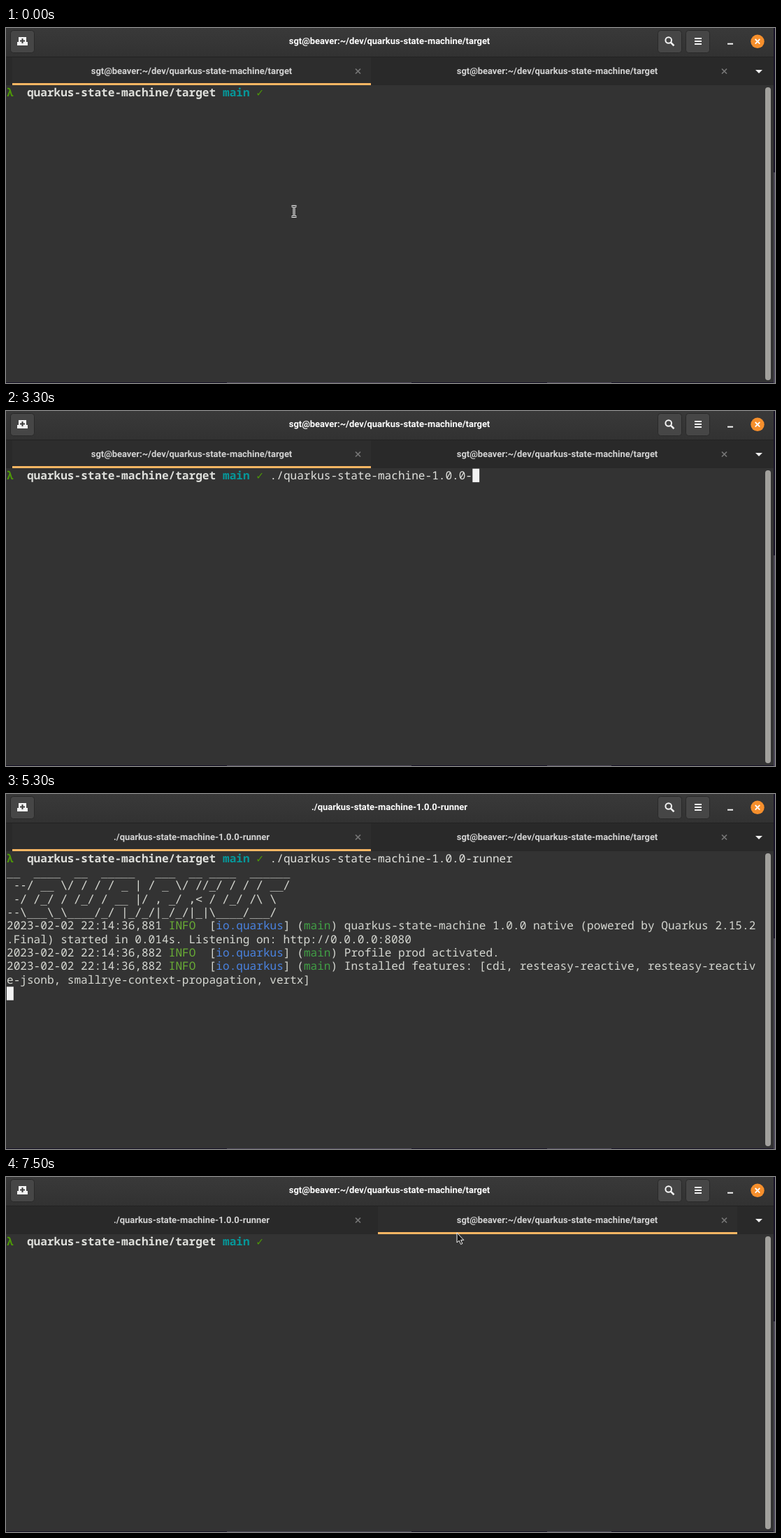
An HTML page for the animation above (8000 ms loop, 1100 by 509 pixels).

```html
<!DOCTYPE html>
<html lang="en">
<head>
<meta charset="utf-8">
<title>Terminal session</title>
<style>
  html, body { margin: 0; width: 100%; height: 100%; overflow: hidden; background: #333; }
  svg { display: block; width: 1100px; height: 509px; }
  text { white-space: pre; text-rendering: geometricPrecision; }
  .mono { font: 16.09px "Noto Sans Mono", "DejaVu Sans Mono", monospace; font-variant-ligatures: none; }
  .mono .b { font-weight: 700; }
  .mono .banner { font: 16.04px "DejaVu Sans Mono", monospace; }
  .ui { font: 700 12.95px Roboto, "Open Sans", sans-serif; text-anchor: middle; }
</style>
</head>
<body>
<svg id="stage" viewBox="0 0 1100 509" xmlns="http://www.w3.org/2000/svg">
  <defs>
    <linearGradient id="bar" x2="0" y2="1">
      <stop stop-color="#393939"/><stop offset="1" stop-color="#323232"/>
    </linearGradient>
  </defs>

  <!-- desktop showing around the window -->
  <rect width="1100" height="509" fill="#171228"/>
  <path d="M1098 207h2v302h-2zM316 508h264v1h-264zM774 508h92v1h-92z" fill="#4b4658"/>
  <rect width="1098" height="508" fill="#333"/>

  <!-- header bar -->
  <rect width="1098" height="41" fill="url(#bar)"/>
  <g fill="#464646" stroke="#292929">
    <rect x="6.5" y="3.5" width="34" height="32" rx="4"/>
    <rect x="932.5" y="3.5" width="34" height="32" rx="4"/>
    <rect x="972.5" y="3.5" width="34" height="32" rx="4"/>
  </g>
  <path d="M18 13h11v7h2v5H16v-5h2z" fill="#f4f4f4"/>
  <path d="M23.5 15v7M20 18.5h7" stroke="#3c3c3c" stroke-width="2"/>
  <g fill="none" stroke="#f4f4f4" stroke-width="2">
    <circle cx="947.7" cy="17.5" r="4.3"/>
    <path d="M950.8 20.6l4.7 4.7" stroke-width="2.6"/>
    <path d="M985 15h10M985 19h10M985 23h10"/>
    <path d="M1032 22.7h8"/>
  </g>
  <circle cx="1075" cy="19.3" r="9.7" fill="#f68f2c"/>
  <path d="M1071.7 16l6.6 6.6M1078.3 16l-6.6 6.6" stroke="#fff" stroke-width="1.8"/>
  <text id="title" class="ui" x="548.5" y="23.2" fill="#fff"></text>

  <!-- tab strip -->
  <rect y="41" width="1098" height="41" fill="#292929"/>
  <rect y="41" width="1098" height="1" fill="#222"/>
  <rect id="activeTab" y="42" height="40" fill="#2d2d2d"/>
  <rect id="hoverLine" x="532" y="79" width="514" height="3" fill="#202020"/>
  <rect id="activeLine" y="79" height="3" fill="#f9b663"/>
  <text id="tabA" class="ui" x="265.5" y="65.8" fill="#d4d4d4"></text>
  <text id="tabB" class="ui" x="788.5" y="65.8" fill="#d4d4d4"></text>
  <path d="M500 58.5l7 7M507 58.5l-7 7M1024 58.5l7 7M1031 58.5l-7 7" stroke="#777" stroke-width="1.7"/>
  <path d="M1072 60h10l-5 5z" fill="#f0f0f0"/>

  <!-- terminal -->
  <rect x="1086" y="85" width="8" height="420" rx="4" fill="#a2a19d"/>
  <g class="mono" fill="#d6d8d2">
    <g id="prompt"></g>
    <text id="typed" fill="#e2e3df"></text>
    <g id="output"></g>
  </g>
  <rect id="caret" width="9.8" height="19.4" fill="#f2f2f2"/>

  <!-- pointers, drawn around their hot spots -->
  <g id="beam" fill="none">
    <path d="M-3.5 -7.5h7M0 -7.5v15M-3.5 7.5h7" stroke="#fff" stroke-width="3"/>
    <path d="M-3.5 -7.5h7M0 -7.5v15M-3.5 7.5h7" stroke="#222"/>
  </g>
  <path id="arrow" d="M0 0v14l3.2-2.8 2.3 5.3 2.4-1-2.3-5.1h4.2z" fill="#161616" stroke="#f4f4f4" stroke-linejoin="round"/>
</svg>

<script>
const LOOP = 8000;
const COL = 9.657, ROW = 19.36, LEFT = 1, TOP = 82.7, BASE = 97.6;
const PROMPT_END = 39;
const SHELL = 'sgt@beaver:~/dev/quarkus-state-machine/target';
const COMMAND = './quarkus-state-machine-1.0.0-runner';
const GREEN = '#4e9a06', CYAN = '#06989a';
const INFO = '#69ad35', BLUE = '#4a83e2', THREAD = '#41a045';

// [time, typed characters, caret column]
const KEYS = [
  [0, 0, 0], [600, 1, 1], [800, 2, 2], [1400, 3, 3], [1600, 4, 4], [1700, 5, 5],
  [1800, 6, 6], [1900, 7, 7], [2200, 9, 9], [2900, 10, 10], [3000, 11, 11],
  [3300, 30, 30], [4100, 31, 31], [4600, 36, 37]
];
const CARET_TOGGLES = [500, 3800, 4100, 5100, 5200, 5800, 6400, 7500];
const LAUNCH = 5200, LOGGED = 5300, SWITCH = 6900;
const MOVE = { start: 6000, steps: 8, from: [412, 263], to: [645, 80] };

const $ = id => document.getElementById(id);
const colX = col => LEFT + col * COL;

function put(parent, row, col, content, fill, style) {
  const node = document.createElementNS('http://www.w3.org/2000/svg', 'text');
  node.setAttribute('x', colX(col));
  node.setAttribute('y', BASE + row * ROW);
  if (fill) node.setAttribute('fill', fill);
  if (style) node.setAttribute('class', style);
  node.textContent = content;
  parent.append(node);
}

function putLog(row, millis, message) {
  const parts = [
    ['2023-02-02 22:14:36,' + millis + ' '], ['INFO', INFO], ['  ['],
    ['io.quarkus', BLUE], ['] ('], ['main', THREAD], [') ' + message]
  ];
  let col = 0;
  for (const [content, fill] of parts) {
    put($('output'), row, col, content, fill);
    col += content.length;
  }
}

function build() {
  const prompt = $('prompt'), output = $('output');
  put(prompt, 0, 0, 'λ', GREEN, 'b');
  put(prompt, 0, 3, 'quarkus-state-machine/target', '#dfe0dc', 'b');
  put(prompt, 0, 32, 'main', CYAN, 'b');
  put(prompt, 0, 37, '✓', GREEN, 'b');
  $('typed').setAttribute('x', colX(PROMPT_END));
  $('typed').setAttribute('y', BASE);

  [
    '__  ____  __  _____   ___  __ ____  ______',
    ' --/ __ \\/ / / / _ | / _ \\/ //_/ / / / __/',
    ' -/ /_/ / /_/ / __ |/ , _/ ,< / /_/ /\\ \\',
    '--\\___\\_\\____/_/ |_/_/|_/_/|_|\\____/___/'
  ].forEach((line, i) => put(output, i + 1, 0, line, null, 'banner'));
  putLog(5, 881, 'quarkus-state-machine 1.0.0 native (powered by Quarkus 2.15.2');
  put(output, 6, 0, '.Final) started in 0.014s. Listening on: http://0.0.0.0:8080');
  putLog(7, 882, 'Profile prod activated.');
  putLog(8, 882, 'Installed features: [cdi, resteasy-reactive, resteasy-reactiv');
  put(output, 9, 0, 'e-jsonb, smallrye-context-propagation, vertx]');
}

function show(id, visible) {
  $(id).setAttribute('visibility', visible ? 'visible' : 'hidden');
}

function label(id, content) {
  if ($(id).textContent !== content) $(id).textContent = content;
}

function drawPointer(t) {
  const step = Math.floor((t - MOVE.start) / 100);
  const p = Math.max(0, Math.min(1, step / MOVE.steps));
  const eased = p * p * (3 - 2 * p);
  const [x, y] = MOVE.from.map((v, i) => v + (MOVE.to[i] - v) * eased);
  const present = t < 600 || t >= MOVE.start;
  const overTabs = y < 82;
  for (const id of ['beam', 'arrow']) $(id).setAttribute('transform', `translate(${x} ${y})`);
  show('beam', present && !overTabs);
  show('arrow', present && overTabs);
  show('hoverLine', overTabs && t < SWITCH);
}

function draw(t) {
  const second = t >= SWITCH, launched = t >= LAUNCH, logged = t >= LOGGED;
  const tabTitle = launched ? COMMAND : SHELL;
  label('title', second ? SHELL : tabTitle);
  label('tabA', tabTitle);
  label('tabB', SHELL);
  for (const id of ['activeTab', 'activeLine']) {
    $(id).setAttribute('x', second ? 532 : 9);
    $(id).setAttribute('width', second ? 514 : 513);
  }

  const [, count, caretCol] = KEYS.filter(key => key[0] <= t).pop();
  label('typed', second ? '' : COMMAND.slice(0, count));
  show('output', logged && !second);

  let row = 0, col = PROMPT_END;
  if (!second) {
    if (launched) [row, col] = [logged ? 10 : 1, 0];
    else col += caretCol;
  }
  $('caret').setAttribute('x', colX(col));
  $('caret').setAttribute('y', TOP + row * ROW);
  show('caret', CARET_TOGGLES.filter(time => time <= t).length % 2 === 1);

  drawPointer(t);
}

build();
const began = performance.now();
function tick() {
  draw((performance.now() - began) % LOOP);
  requestAnimationFrame(tick);
}
tick();
</script>
</body>
</html>
```
